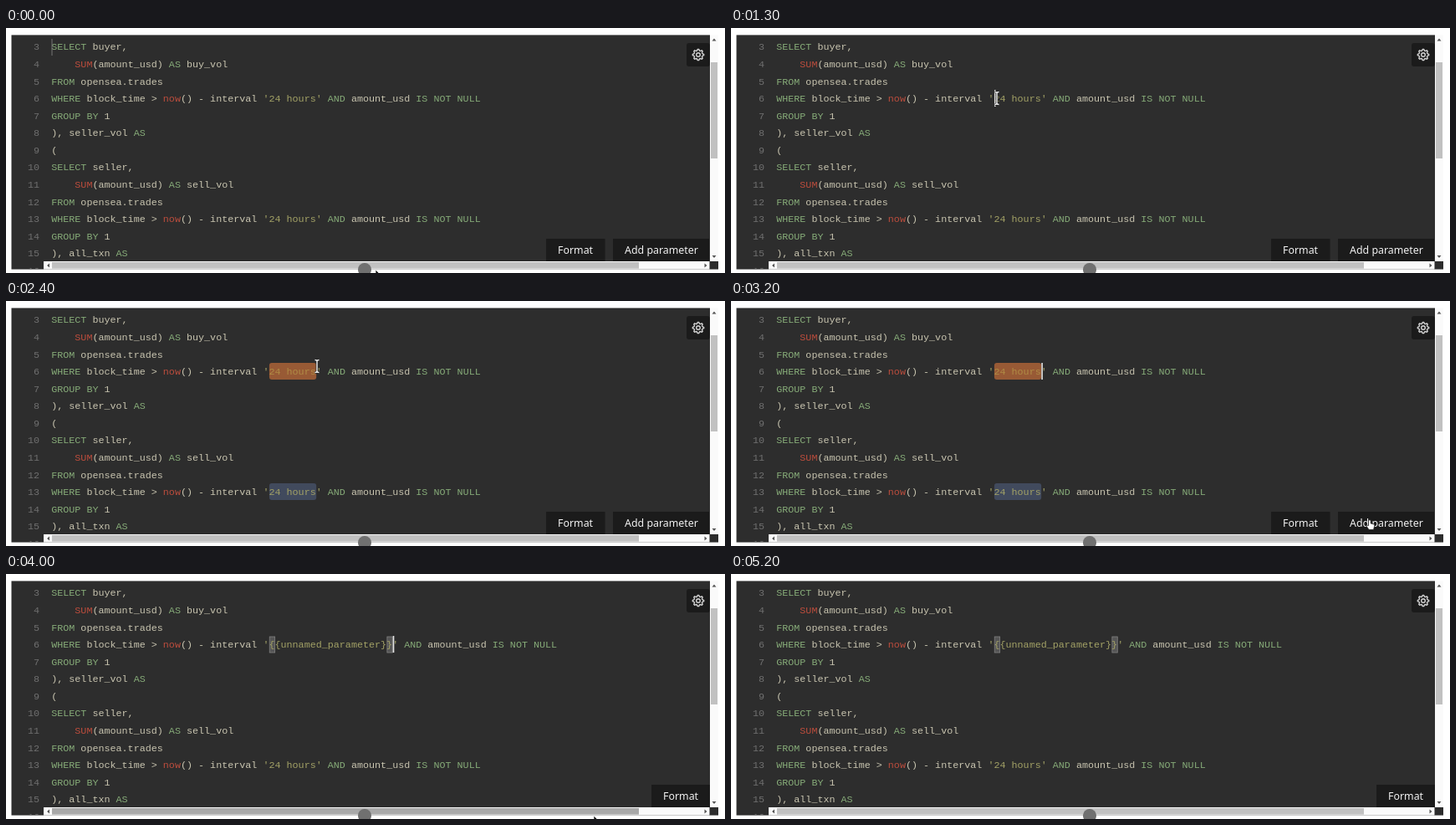
These frames come from a looping animation (860x293 px, 5300 ms). An HTML page:

```html
<!DOCTYPE html>
<html lang="en">
<head>
<meta charset="utf-8">
<title>Query editor</title>
<style>
  html, body { margin: 0; width: 100%; height: 100%; overflow: hidden; background: #fff; }
  svg { display: block; width: 860px; height: 293px; }
  .code text { font: 11.72px "Liberation Mono", "Noto Sans Mono", monospace; fill: #c9c5b0; white-space: pre; }
  .code .num { fill: #707070; text-anchor: end; }
  .kw { fill: #86ab78; }
  .fn { fill: #bd4d3d; }
  .str { fill: #a3a266; }
  .sel { fill: #b08c45; }
  .ui text { font: 12.4px "Noto Sans", "Open Sans", sans-serif; fill: #f2f2f2; }
  .btn { fill: #1b1b1b; }
  .arrow { fill: #555; }
</style>
</head>
<body>
<svg viewBox="0 0 860 293">
  <defs>
    <clipPath id="pane"><rect x="6.500" y="8.400" width="835.500" height="280.200"/></clipPath>
  </defs>
  <rect width="860" height="293" fill="#fff"/>
  <rect x="6.500" y="8.400" width="835.500" height="280.200" fill="#2d2d2d"/>
  <g id="marks"></g>
  <g id="code" class="code" clip-path="url(#pane)"></g>
  <rect id="caret" y="74" width="1.6" height="20" fill="#e4e4e4"/>
  <rect id="oldCaret" x="54.5" y="13" width="1" height="20" fill="#777"/>

  <g class="ui">
    <rect class="btn" x="814" y="18" width="28" height="28" rx="3"/>
    <path id="gear" fill="none" stroke="#d4d4d4" stroke-width="1.4" stroke-linejoin="round"/>
    <circle cx="828" cy="32" r="2.3" fill="none" stroke="#d4d4d4" stroke-width="1.4"/>
    <g id="format">
      <rect class="btn" x="646" y="252" width="70.5" height="27"/>
      <text x="660" y="269.6">Format</text>
    </g>
    <g id="add">
      <rect class="btn" x="726" y="252" width="115" height="27"/>
      <text x="740" y="269.6">Add parameter</text>
    </g>
  </g>

  <rect x="842" y="8.400" width="10" height="271" fill="#fafafa"/>
  <rect x="843" y="41" width="8" height="115" fill="#c1c1c1"/>
  <path class="arrow" d="M844.5 15.5l2.5-3 2.5 3zM844.5 272l2.5 3 2.5-3z"/>
  <rect x="45" y="279" width="797" height="9.600" fill="#fafafa"/>
  <rect x="841.500" y="279" width="10.500" height="9.600" fill="#2d2d2d"/>
  <rect id="thumb" x="55" y="280" width="702" height="7.600"/>
  <path class="arrow" d="M52 281.5l-3 2.5 3 2.5zM835.5 281.5l3 2.5-3 2.5z"/>
  <circle cx="429" cy="289" r="8" fill="#707070"/>

  <g id="arrow"><path d="M0 0V13l3.2-2.8 2 4.6 2-.9-2-4.4H9.500z" fill="#111" stroke="#fff" stroke-width=".7"/></g>
  <g id="beam" fill="none">
    <path id="beamEdge" stroke="#222" stroke-width="2.8"/>
    <path id="beamCore" stroke="#f4f4f4" stroke-width="1.4"/>
  </g>
  <g id="hand"><path d="M-1.500-3.500Q0-5 1.200-3.500V0L5 1Q6 1.500 5.700 3L4.500 7.500H-1L-4 3Q-4 1.500-1.500 2.500z" fill="#fff" stroke="#222" stroke-width=".8"/></g>
</svg>
<script>
const $ = id => document.getElementById(id);
const LOOP = 5300, STEP = 100;
const LEFT = 54.2, CHAR = 7.033, ROW = 20.57, BASE = 26.4;
const STRING_COL = 37, PARAM = '{{unnamed_parameter}}', HOURS = '24 hours';
const INSERT_AT = 3400;

const where = value =>
  `WHERE block_time > now() - interval '${value}' AND amount_usd IS NOT NULL`;
const volume = side => [
  `SELECT ${side}er,`, `    SUM(amount_usd) AS ${side}_vol`, 'FROM opensea.trades',
  where(HOURS), 'GROUP BY 1'
];
const lines = [
  ...volume('buy'), '), seller_vol AS', '(',
  ...volume('sell'), '), all_txn AS', ''
];

const colX = col => LEFT + CHAR * col;
const span = (cls, s) => `<tspan class="${cls}">${s}</tspan>`;
const escape = s => s.replace('>', '&gt;');

function highlight(line, selected = 0) {
  return line.split(/('[^']*'|\b(?:SELECT|AS|FROM|WHERE|AND|IS|NOT|NULL|GROUP|BY|SUM|now)\b)/)
    .map((part, i) => {
      if (i % 2 === 0) return escape(part);
      if (part[0] === "'") {
        const cut = selected + 1;
        return span('str', "'") + span('sel', part.slice(1, cut)) + span('str', part.slice(cut));
      }
      return span(/SUM|now/.test(part) ? 'fn' : 'kw', part);
    }).join('');
}

$('code').innerHTML = lines.map((line, i) => {
  const y = (BASE + ROW * i).toFixed(2);
  return `<text class="num" x="40" y="${y}">${i + 3}</text>` +
    `<text id="row${i}" x="${LEFT}" y="${y}">${highlight(line)}</text>`;
}).join('');

const teeth = Array.from({ length: 32 }, (_, i) => {
  const a = (i - 0.5) * Math.PI / 16;
  const r = i % 4 < 2 ? 6.7 : 5.1;
  return `${(828 + r * Math.cos(a)).toFixed(2)} ${(32 + r * Math.sin(a)).toFixed(2)}`;
});
$('gear').setAttribute('d', `M${teeth.join('L')}z`);

const beamPath = 'M-2.500-7.500Q0-7.500 0-6V6Q0 7.500-2.500 7.500M2.500-7.500Q0-7.500 0-6M0 6Q0 7.500 2.500 7.500';
$('beamEdge').setAttribute('d', beamPath);
$('beamCore').setAttribute('d', beamPath);

// Pointer stops: time, x, y
const path = [
  [0, 442, 289], [200, 490, 215], [300, 508, 175], [500, 420, 105], [600, 366, 87],
  [800, 362, 86], [900, 362, 86], [1000, 318, 84], [1300, 318, 84],
  [1700, 368, 81], [1800, 371, 79], [1900, 372, 78], [2500, 372, 78],
  [3100, 762, 265], [3200, 764, 266], [3800, 764, 266],
  [4000, 703, 289], [4100, 685, 315], [LOOP, 685, 315]
];

function pointer(t) {
  const i = path.findIndex(p => p[0] > t);
  const [t0, x0, y0] = path[i - 1], [t1, x1, y1] = path[i];
  let k = (t - t0) / (t1 - t0);
  if (t0 === 2500) k = (1 - Math.cos(Math.PI * k)) / 2;
  return [x0 + (x1 - x0) * k, y0 + (y1 - y0) * k];
}

const show = (id, on) => $(id).setAttribute('visibility', on ? 'visible' : 'hidden');
const box = (col, row, chars, style) =>
  `<rect x="${colX(col) + 0.5}" y="${14 + ROW * row - 1.7}" width="${CHAR * chars}" height="20" rx="3" ${style}/>`;
const brace = col =>
  `<rect x="${colX(col) + 0.8}" y="75" width="6.4" height="19" fill="#555" stroke="#808080" stroke-width=".8"/>`;

function caretOn(t) {
  if (t < 1300) return false;
  if (t < INSERT_AT) return t < 2400 || t >= 2900;
  return t < 4200 || (t >= 4600 && t < 5200);
}

function draw(t) {
  const [x, y] = pointer(t);
  const inserted = t >= INSERT_AT;
  const picked = t < 1300 || inserted ? 0
    : t >= 1800 ? 8 : Math.floor((x - colX(STRING_COL)) / CHAR);

  $('row3').innerHTML = highlight(where(inserted ? PARAM : HOURS), picked);
  let marks = '';
  if (picked) marks += box(STRING_COL, 3, picked, 'fill="#985a35"');
  if (picked === 8) marks += box(STRING_COL, 10, 8, 'fill="#414a5d"');
  if (inserted) marks += brace(STRING_COL) + brace(STRING_COL + PARAM.length - 1);
  $('marks').innerHTML = marks;

  $('caret').setAttribute('x', colX(STRING_COL + (inserted ? PARAM.length : picked)) + 0.6);
  show('caret', caretOn(t));
  show('oldCaret', t < 1300);
  show('add', !inserted);
  $('format').setAttribute('transform', `translate(${inserted ? 126 : 0})`);
  $('thumb').setAttribute('fill', t >= 3900 && t < 4100 ? '#a8a8a8' : '#c1c1c1');

  const overButton = !inserted && x > 726 && y > 252;
  const kind = y >= 276 ? 'arrow' : overButton ? 'hand' : 'beam';
  for (const id of ['arrow', 'beam', 'hand']) show(id, id === kind);
  $(kind).setAttribute('transform', `translate(${x} ${y})`);
}

const start = performance.now();
let last = -1;
function tick() {
  const t = Math.floor((performance.now() - start) % LOOP / STEP) * STEP;
  if (t !== last) draw(last = t);
  requestAnimationFrame(tick);
}
tick();
</script>
</body>
</html>
```
